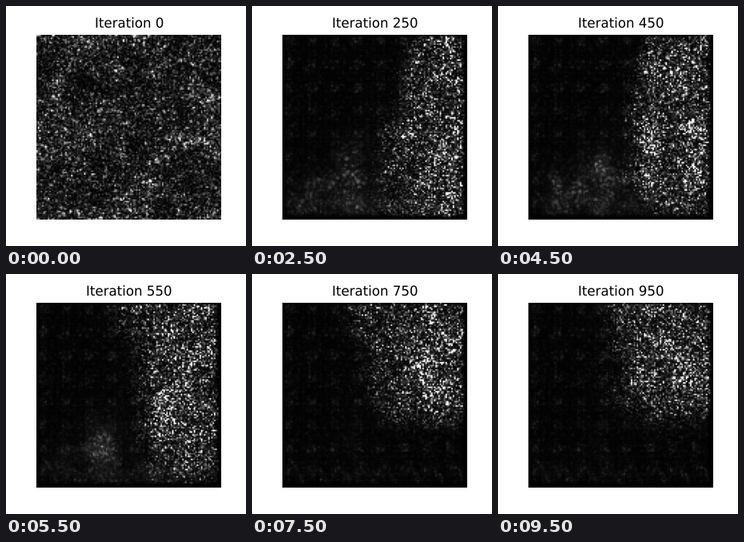
A matplotlib script that plays this animation: 300x300 px, repeating every 10000 ms.

```python
import numpy as np
import matplotlib.pyplot as plt
from matplotlib.animation import FuncAnimation

N = 128
FRAMES = 20
STEP = 50
INTERVAL = 500
CELL = 16

plt.rcParams["font.family"] = "DejaVu Sans"
plt.rcParams["text.hinting"] = "none"

row, col = np.mgrid[:N, :N]
u, v = (col + 0.5) / N, (row + 0.5) / N
freq = np.fft.fftfreq(N)
freq_sq = freq[:, None] ** 2 + freq ** 2


def sigmoid(x):
    return 1 / (1 + np.exp(-x))


def ease(i, start, end):
    t = np.clip((i - start) / (end - start), 0, 1)
    return t * t * (3 - 2 * t)


def mix(a, b, t):
    return a + (b - a) * t


def blob(cx, cy, rx, ry):
    return np.exp(-((u - cx) / rx) ** 2 - ((v - cy) / ry) ** 2)


def soft_noise(rng, sigma):
    """Unit Gaussian noise blurred over sigma cells."""
    spectrum = np.fft.fft2(rng.normal(size=(N, N)))
    field = np.fft.ifft2(spectrum * np.exp(-2 * (np.pi * sigma) ** 2 * freq_sq)).real
    return field / field.std()


def speckle(rng, sigma):
    """Clumpy intensity noise with mean 1."""
    return (soft_noise(rng, sigma) ** 2 + soft_noise(rng, sigma) ** 2) / 2


def make_lattice():
    rng = np.random.default_rng(5)
    wave = lambda x: 0.5 + 0.5 * np.cos(2 * np.pi * (x - 4) / CELL)
    spots = (wave(col) * wave(row)) ** 2
    streaks = wave(col - 0.6 * row) ** 4 * sigmoid((v - 0.87) / 0.02)
    edge_line = np.exp(-((col - 4) / 1.2) ** 2)
    stripes = 0.8 + 0.4 * (col % 4 == 2) + 0.3 * (row % 4 == 2)
    return (0.4 + 0.9 * spots + 0.8 * streaks + 0.5 * edge_line) * stripes * mix(
        0.4, 1, speckle(rng, 0.7))


LATTICE = make_lattice()
BORDER = (sigmoid((col - 1.5) * 2) * sigmoid((N - 3.5 - col) * 2)
          * sigmoid((row - 0.5) * 2) * sigmoid((N - 3.5 - row) * 2))


def image_at(i):
    rng = np.random.default_rng(100 + i)
    patches = np.exp(0.28 * soft_noise(rng, 5) - 0.04)
    if i == 0:
        return np.clip(0.13 * speckle(rng, 0.55) * patches, 0, 1)

    # The bright area leans right at first, then tips over and shrinks upward.
    turn, lift = ease(i, 7, 11), ease(i, 9, 15)
    lean = mix(-0.17, 0.15, turn)
    bend = mix(0.3, 0, turn)
    edge = mix(0.57, 0.5, lift) + lean * (v - 0.5) + bend * (v - 0.5) ** 2
    edge = edge + 0.03 * soft_noise(rng, 7)
    floor = mix(1.03, 0.59, lift)

    active = sigmoid((u - edge - 0.02) / 0.04) * sigmoid((floor - v) / 0.04)
    active *= mix(0.6, 1, blob(0.82, min(0.45, 0.6 * floor), 0.28, 0.5))
    sparse = soft_noise(rng, 0.45) ** 2 * (0.85 + 0.3 * (col % 2))

    glow = mix(0.11, 0.012, lift)
    dim = blob(0.37, 0.78, 0.11, 0.17) + 0.7 * blob(0.14, 0.88, 0.08, 0.12)
    dim += 0.5 * blob(0.5, 0.93, 0.25, 0.1)
    haze = mix(0.4, 1, speckle(rng, 0.8)) * patches ** 1.5

    picture = 0.27 * active * sparse * patches + glow * dim * haze + 0.045 * LATTICE
    return np.clip(picture * BORDER, 0, 1)


fig, ax = plt.subplots(figsize=(3, 3), dpi=100)
ax.axis("off")
picture = ax.imshow(image_at(0), cmap="gray", vmin=0, vmax=1)
title = ax.set_title("Iteration 0")


def update(i):
    picture.set_data(image_at(i))
    title.set_text(f"Iteration {i * STEP}")
    return picture, title


anim = FuncAnimation(fig, update, frames=FRAMES, interval=INTERVAL,
                     repeat=True, repeat_delay=0)
plt.show()
```
